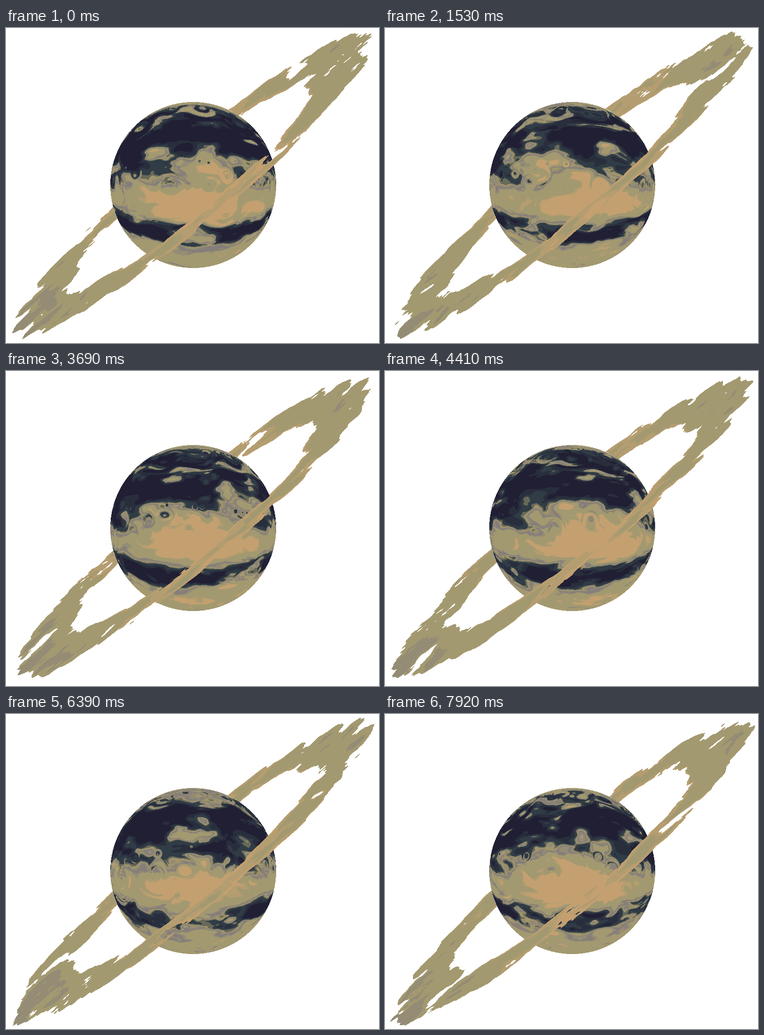
Recreate the animation shown at these times as an HTML page with a canvas. Size 787 px wide and 664 px high, loop 8 s.

```html
<!DOCTYPE html>
<html lang="en">
<head>
<meta charset="utf-8">
<title>Ringed gas giant</title>
<style>
  html, body { margin: 0; width: 100%; height: 100%; overflow: hidden; background: #fff; }
  canvas { display: block; }
</style>
</head>
<body>
<canvas id="stage" width="787" height="664"></canvas>
<script>
const W = 787, H = 664, CX = 394.5, CY = 330.5, R = 175;
const LOOP = 8000, STEP = 90, TURN = 10800;
const LIGHT_X = 0.54, LIGHT_Y = 0.5;
const ctx = document.getElementById('stage').getContext('2d');
const image = ctx.createImageData(W, H);
const pixels = new Uint32Array(image.data.buffer);

const pack = ([r, g, b]) => (255 << 24 | b << 16 | g << 8 | r) >>> 0;
const mix = (a, b) => a.map((v, i) => Math.round((v + b[i]) / 2));
const clamp = x => x < 0 ? 0 : x > 1 ? 1 : x;
const smooth = (a, b, x) => { const t = clamp((x - a) / (b - a)); return t * t * (3 - 2 * t); };

const ORANGE = [196, 160, 112], OLIVE = [163, 153, 112], GRAY = [133, 126, 122];
const KHAKI = [160, 149, 108], SLATE = [48, 60, 70], NAVY = [33, 31, 52];
const TONES = [ORANGE, OLIVE, GRAY, KHAKI, SLATE, NAVY];
const BLENDS = TONES.map(a => TONES.map(b => pack(mix(a, b))));
const RING_TONES = [ORANGE, mix(ORANGE, OLIVE), OLIVE, mix(OLIVE, GRAY), GRAY].map(pack);

// Value noise on a wrapping lattice of 2n by n cells
function makeNoise(n, seed) {
  const w = 2 * n, table = new Float32Array(w * n);
  for (let y = 0; y < n; y++) {
    for (let x = 0; x < w; x++) {
      const s = Math.sin(x * 12.9898 + y * 78.233) * 15.5453 * seed;
      table[y * w + x] = s - Math.floor(s);
    }
  }
  const cell = (x, y) => table[((y % n) + n) % n * w + ((x % w) + w) % w];
  function noise(x, y) {
    const ix = Math.floor(x), iy = Math.floor(y);
    let u = x - ix, v = y - iy;
    u *= u * (3 - 2 * u);
    v *= v * (3 - 2 * v);
    const a = cell(ix, iy), b = cell(ix + 1, iy);
    const c = cell(ix, iy + 1), d = cell(ix + 1, iy + 1);
    const top = a + (b - a) * u;
    return top + (c + (d - c) * u - top) * v;
  }
  function fbm(x, y, octaves) {
    let sum = 0, scale = 0.5;
    for (let i = 0; i < octaves; i++) {
      sum += noise(x, y) * scale;
      x *= 2; y *= 2; scale *= 0.5;
    }
    return sum;
  }
  return { cell, fbm };
}

const SIZE = 10, RING_SIZE = 15;
const gas = makeNoise(SIZE, 6.314);
const dust = makeNoise(RING_SIZE, 8.461);

// Cloud density by latitude: [v, density]
const BANDS = [
  [0, 0.34], [0.07, 0.38], [0.15, 0.54], [0.2, 0.6], [0.25, 0.63], [0.29, 0.74], [0.345, 0.8],
  [0.385, 0.7], [0.425, 0.635], [0.457, 0.6], [0.495, 0.54], [0.525, 0.42], [0.545, 0.35],
  [0.585, 0.35], [0.61, 0.47], [0.635, 0.62], [0.67, 0.73], [0.7, 0.65], [0.725, 0.47],
  [0.76, 0.42], [0.81, 0.28], [0.84, 0.35], [1, 0.34]
];
function bandAt(v) {
  let i = 1;
  while (i < BANDS.length - 1 && BANDS[i][0] < v) i++;
  const [v0, d0] = BANDS[i - 1], [v1, d1] = BANDS[i];
  return d0 + (d1 - d0) * clamp((v - v0) / (v1 - v0));
}

function buildPlanet() {
  const list = [], left = Math.ceil(CX - R), top = Math.ceil(CY - R);
  for (let py = 0; py < 2 * R; py++) {
    for (let px = 0; px < 2 * R; px++) {
      const x = (px + 0.5) / R - 1, y = (py + 0.5) / R - 1, rr = x * x + y * y;
      if (rr > 1) continue;
      const z = 1 + Math.sqrt(1 - rr);
      const u = x / z / 2 + 0.5, v = y / z / 2 + 0.5;
      list.push({
        at: (py + top) * W + px + left,
        u, v,
        warp: gas.fbm(u * SIZE, v * SIZE, 3),
        gain: bandAt(v) ** 2 * 7,
        light: Math.hypot(x / 2 + 0.5 - LIGHT_X, y / 2 + 0.5 - LIGHT_Y)
      });
    }
  }
  return list;
}

// Round storms, drifting against the clouds
function storms(x, y) {
  let sum = 0;
  const row0 = Math.floor(y), fy = y - row0;
  for (let i = 11; i < 21; i++) {
    const row = row0 + i, sx = x + i + row * 0.31, col = Math.floor(sx);
    const h = gas.cell(col, row), c = 0.25 + h * 0.5;
    const dx = sx - col - c, dy = fy - c;
    const t = 3 * Math.sqrt(dx * dx + dy * dy) / (h + 1e-6);
    sum += t >= 1 ? 1 : t * t * (3 - 2 * t);
  }
  return sum;
}

const tone = v => v < 0.25 ? 0 : v < 0.5 ? 1 : v < 0.625 ? 2 : v < 0.75 ? 3 : v < 1 ? 4 : 5;

function drawPlanet(turn) {
  const shift = turn * 2 * SIZE;
  for (const p of planet) {
    const swirl = storms(p.u * SIZE * 0.3 + shift, p.v * SIZE * 0.3) + p.warp;
    const cloud = p.gain * gas.fbm(p.u * SIZE - shift + swirl, p.v * 2 * SIZE + swirl, 3);
    const shade = smooth(-0.2, 4.3 - cloud - p.light, cloud + p.light * 1.8);
    pixels[p.at] = BLENDS[tone(shade)][tone(shade * 1.1)];
  }
}

const SPAN = 6 * R, TILT = 40 * Math.PI / 180, FLATTEN = 6, RING_W = 0.127;
// Gaps in the ring: [angle, radius, angular spread]
const GAPS = [[50, 0.39, 4], [114, 0.41, 4], [176, 0.4, 8], [323, 0.4, 6]]
  .map(([a, d, s]) => [a * Math.PI / 180, d, s * Math.PI / 180]);

function buildRing() {
  const list = [], c = Math.cos(TILT), s = Math.sin(TILT);
  for (let py = 0; py < H; py++) {
    for (let px = 0; px < W; px++) {
      const dx = (px + 0.5 - CX) / SPAN, dy = (py + 0.5 - CY) / SPAN;
      const x = dx * c - dy * s, flat = dx * s + dy * c, y = flat * FLATTEN;
      const d = Math.hypot(x, y);
      const mask = smooth(0.5 - RING_W * 2, 0.5 - RING_W, d) * smooth(d - RING_W, d, 0.4);
      if (mask < 0.28) continue;
      if (flat < 0 && Math.hypot(dx, dy) < R / SPAN) continue;
      const lx = dx + 0.5 - LIGHT_X, ly = dy + 0.5 - LIGHT_Y;
      list.push({ at: py * W + px, x, y, d, mask, angle: Math.atan2(y, x), glow: 2.2 * (lx * lx + ly * ly) });
    }
  }
  return list;
}

function gapDepth(angle, d) {
  let sum = 0;
  for (const [a, r, spread] of GAPS) {
    let da = angle - a;
    da -= Math.round(da / (2 * Math.PI)) * 2 * Math.PI;
    const k = (da / spread) ** 2 + ((d - r) / 0.014) ** 2;
    if (k < 6) sum += 0.22 * Math.exp(-k);
  }
  return sum;
}

function drawRing(turn) {
  const a = turn * 2 * Math.PI, c = Math.cos(a), s = Math.sin(a);
  for (const p of ring) {
    const x = p.x * c - p.y * s + 0.5, y = p.x * s + p.y * c + 0.5;
    const density = p.mask * (dust.fbm(x * RING_SIZE, y * RING_SIZE, 4) + 0.03 - gapDepth(p.angle + a, p.d));
    if (density < 0.28) continue;
    const q = density * 0.65 + p.glow;
    pixels[p.at] = RING_TONES[q < 0.26 ? 0 : q < 0.37 ? 1 : q < 0.7 ? 2 : q < 0.95 ? 3 : 4];
  }
}

const planet = buildPlanet(), ring = buildRing();
let shown = -1;

function render(now) {
  const step = Math.floor((now % LOOP) / STEP);
  if (step !== shown) {
    shown = step;
    const turn = step * STEP / TURN;
    pixels.fill(0xffffffff);
    drawPlanet(turn);
    drawRing(turn);
    ctx.putImageData(image, 0, 0);
  }
}

const start = performance.now();
function tick() {
  render(performance.now() - start);
  requestAnimationFrame(tick);
}
tick();
</script>
</body>
</html>
```
